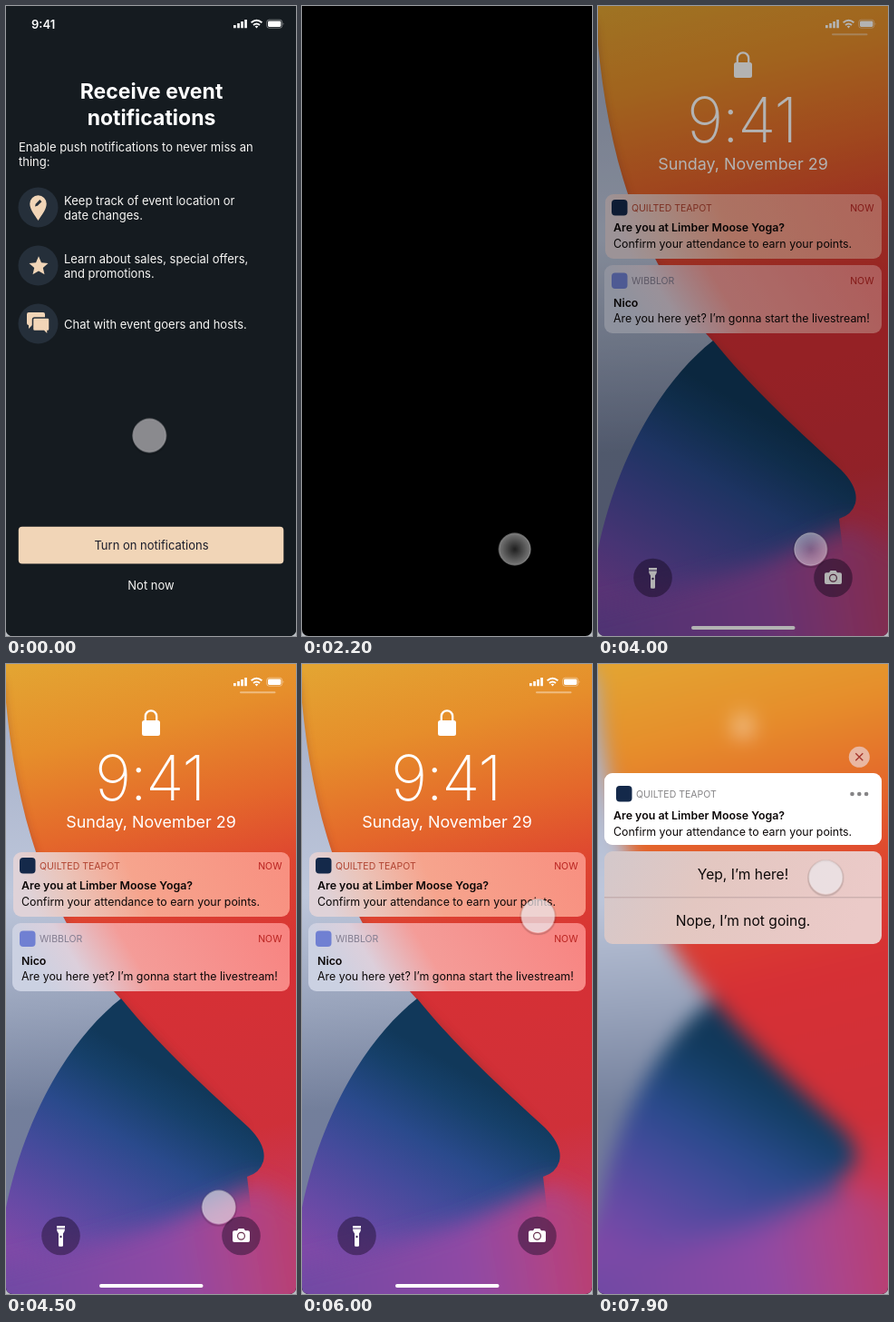
An HTML page for the animation above (8000 ms loop, 320 by 693 pixels).

```html
<!DOCTYPE html>
<html lang="en">
<head>
<meta charset="utf-8">
<title>Event notifications</title>
<style>
  html, body { margin: 0; width: 100%; height: 100%; overflow: hidden; background: #b9bec4; }
  svg { display: block; width: 100vw; height: 100vh; }
  text { font-family: Inter, Roboto, sans-serif; }
  .mid { text-anchor: middle; }
  .end { text-anchor: end; }
  .body { font-size: 13px; fill: #f7f6f4; }
  .note { font-size: 12.4px; fill: #0c0808; }
  .bold { font-weight: 600; }
  .label { font-size: 10.5px; }
  .option { font-size: 15.6px; fill: #0c0808; text-anchor: middle; }

  /* Every part shares one 8 s timeline: 1% = 80 ms */
  .app, .lock, .fade, .dim, .blur, .rise, .head, .copy, .plate,
  .show, .drop, .curX, .curY, .press, .idle, .held {
    animation: 8s linear infinite both;
  }
  .app { animation-name: app; }
  .lock { animation-name: lock; }
  .fade { animation-name: fade; }
  .dim { animation-name: dim; }
  .blur { animation-name: blur; }
  .rise { animation-name: rise; }
  .head { animation-name: head; }
  .copy { animation-name: copy; }
  .plate { animation-name: plate; }
  .show { animation-name: show; }
  .drop { animation-name: drop; transform-origin: 160px 206px; }
  .curX { animation-name: curX; }
  .curY { animation-name: curY; }
  .press { animation-name: press; }
  .idle { animation-name: idle; }
  .held { animation-name: held; }

  @keyframes app { 0%, 22.8% { opacity: 1; } 27.5%, 100% { opacity: 0; } }
  @keyframes lock {
    0%, 46.25% { opacity: 0; animation-timing-function: ease-out; }
    53.5%, 100% { opacity: 1; }
  }
  @keyframes fade { 0%, 90.6% { opacity: 1; } 94.5%, 100% { opacity: 0; } }
  @keyframes dim { 0%, 90.6% { opacity: 1; } 97%, 100% { opacity: .6; } }
  @keyframes blur {
    0%, 90.6% { filter: blur(0); animation-timing-function: ease-out; }
    97%, 100% { filter: blur(11px); }
  }
  @keyframes rise {
    0%, 90.6% { transform: none; animation-timing-function: ease-in-out; }
    97%, 100% { transform: translateY(-87px); }
  }
  @keyframes head {
    0%, 90.6% { transform: none; fill: #b0422f; animation-timing-function: ease-in-out; }
    97%, 100% { transform: translate(5px, 8px); fill: #858486; }
  }
  @keyframes copy {
    0%, 90.6% { transform: none; animation-timing-function: ease-in-out; }
    97%, 100% { transform: translateY(10px); }
  }
  @keyframes plate {
    0%, 90.6% { x: 8px; width: 305px; height: 71px; animation-timing-function: ease-in-out; }
    97%, 100% { x: 7px; width: 306px; height: 79px; }
  }
  @keyframes show { 0%, 91% { opacity: 0; } 96.5%, 100% { opacity: 1; } }
  @keyframes drop {
    0%, 91% { opacity: 0; transform: translateY(40px) scale(.6); animation-timing-function: ease-out; }
    97.5%, 100% { opacity: 1; transform: none; }
  }
  @keyframes curX {
    0%, 1% { transform: translateX(158.3px); animation-timing-function: ease-in-out; }
    19%, 57.5% { transform: translateX(234.7px); animation-timing-function: ease-in-out; }
    73% { transform: translateX(262px); animation-timing-function: ease-in-out; }
    80.5%, 100% { transform: translateX(251.3px); }
  }
  @keyframes curY {
    0%, 1% { transform: translateY(472.5px); animation-timing-function: ease-in-out; }
    19%, 57.5% { transform: translateY(597.5px); animation-timing-function: ease-in-out; }
    80.5%, 100% { transform: translateY(234.5px); }
  }
  @keyframes press {
    0%, 19% { transform: none; }
    20.5%, 47% { transform: scale(.95); }
    52%, 100% { transform: none; }
  }
  @keyframes idle { 0%, 19% { opacity: .55; } 21%, 48% { opacity: 0; } 55% { opacity: .62; } 64%, 100% { opacity: .75; } }
  @keyframes held { 0%, 19% { opacity: 0; } 21%, 48% { opacity: 1; } 55%, 100% { opacity: 0; } }
</style>
</head>
<body>
<svg viewBox="0 0 320 693" preserveAspectRatio="none">
  <defs>
    <clipPath id="screen"><rect y="-20" width="320" height="713" rx="7"/></clipPath>

    <linearGradient id="sunset" gradientUnits="userSpaceOnUse" x1="70" y1="-10" x2="240" y2="700">
      <stop offset="0" stop-color="#e3a432"/>
      <stop offset=".13" stop-color="#e68e2b"/>
      <stop offset=".27" stop-color="#e4672b"/>
      <stop offset=".38" stop-color="#de4530"/>
      <stop offset=".52" stop-color="#d63035"/>
      <stop offset=".76" stop-color="#cf3039"/>
      <stop offset=".88" stop-color="#c8385a"/>
      <stop offset="1" stop-color="#b8437a"/>
    </linearGradient>
    <linearGradient id="haze" gradientUnits="userSpaceOnUse" x1="20" y1="80" x2="50" y2="560">
      <stop offset="0" stop-color="#a9b3cb"/>
      <stop offset=".36" stop-color="#bec7db"/>
      <stop offset=".62" stop-color="#98a3bb"/>
      <stop offset=".85" stop-color="#737f9b"/>
      <stop offset="1" stop-color="#737c9b"/>
    </linearGradient>
    <linearGradient id="dome" gradientUnits="userSpaceOnUse" x1="235" y1="480" x2="110" y2="700">
      <stop offset="0" stop-color="#11385a"/>
      <stop offset=".13" stop-color="#16406a"/>
      <stop offset=".35" stop-color="#2a4a8c"/>
      <stop offset=".55" stop-color="#434b9b"/>
      <stop offset=".8" stop-color="#654aa5"/>
      <stop offset="1" stop-color="#7e49a7"/>
    </linearGradient>
    <linearGradient id="dusk" gradientUnits="userSpaceOnUse" x1="-40" y1="660" x2="330" y2="600">
      <stop offset="0" stop-color="#6b4aa4"/>
      <stop offset=".6" stop-color="#9049a4"/>
      <stop offset=".82" stop-color="#ae4488"/>
      <stop offset="1" stop-color="#bd3f68"/>
    </linearGradient>
    <linearGradient id="glassA" y1=".1" x2="1" y2="0">
      <stop offset="0" stop-color="#dfd2d8"/>
      <stop offset=".15" stop-color="#eac5bb"/>
      <stop offset=".4" stop-color="#f6a48d"/>
      <stop offset="1" stop-color="#f88f80"/>
    </linearGradient>
    <linearGradient id="glassB" y1=".15" x2="1" y2="0">
      <stop offset="0" stop-color="#cbd1e2"/>
      <stop offset=".16" stop-color="#dccfdb"/>
      <stop offset=".38" stop-color="#f49c98"/>
      <stop offset="1" stop-color="#f88380"/>
    </linearGradient>
    <linearGradient id="glassC" x2="1" y2=".15">
      <stop offset="0" stop-color="#d3c8cb"/>
      <stop offset=".4" stop-color="#e3c7c1"/>
      <stop offset="1" stop-color="#ebcac8"/>
    </linearGradient>
    <radialGradient id="ring">
      <stop offset="0" stop-color="#fff" stop-opacity=".12"/>
      <stop offset="1" stop-color="#fff" stop-opacity=".47"/>
    </radialGradient>
    <filter id="soft" x="-30%" y="-60%" width="160%" height="220%"><feGaussianBlur stdDeviation="13"/></filter>
    <filter id="shade" x="-20%" y="-20%" width="140%" height="140%"><feGaussianBlur stdDeviation="5"/></filter>

    <g id="status" fill="#fff">
      <path d="M251 21h2.7v3.2H251zM255.200 19h2.700v5.200h-2.700zM259.200 17h2.700v7.200h-2.700zM263.200 15h2.700v9.200h-2.700z"/>
      <path d="M270.600 18.300q5.900-5 11.800 0M273 21q3.500-2.900 7 0" fill="none" stroke="#fff" stroke-width="2"/>
      <path d="M274.600 22.300q1.900-1.300 3.800 0l-1.900 2.200z"/>
      <rect x="287.700" y="15.200" width="17" height="9" rx="2.600" fill="none" stroke="#fff" stroke-opacity=".5" stroke-width=".8"/>
      <rect x="289" y="16.500" width="14.400" height="6.400" rx="1.400"/>
      <path d="M305.700 18.300q1.500 1.400 0 2.800z" opacity=".6"/>
    </g>
  </defs>

  <g clip-path="url(#screen)">
    <rect width="320" height="693"/>

    <g class="app">
      <rect width="320" height="693" fill="#151b20"/>
      <text x="28" y="25" font-size="13" font-weight="600" fill="#fff">9:41</text>
      <use href="#status"/>
      <g class="mid" font-size="23" font-weight="700" fill="#fff">
        <text x="160.500" y="101.500">Receive event</text>
        <text x="160.500" y="130.500">notifications</text>
      </g>
      <g class="body">
        <text x="14" y="159.500">Enable push notifications to never miss an</text>
        <text x="14" y="175.500">thing:</text>
        <text x="64" y="218.500">Keep track of event location or</text>
        <text x="64" y="234.500">date changes.</text>
        <text x="64" y="282.500">Learn about sales, special offers,</text>
        <text x="64" y="298.500">and promotions.</text>
        <text x="64" y="354.500">Chat with event goers and hosts.</text>
        <text x="160" y="641.500" class="mid">Not now</text>
      </g>
      <g fill="#252f3a">
        <circle cx="35.500" cy="221.500" r="22"/>
        <circle cx="35.500" cy="285.500" r="22"/>
        <circle cx="35.500" cy="349.500" r="22"/>
      </g>
      <g fill="#f1d5b7">
        <path d="M35.500 236C31 229 26.300 223.500 26.300 217.500a9.200 9.200 0 0 1 18.400 0C44.700 223.500 40 229 35.500 236z"/>
        <path d="M32 220.500l.7-2.800 4.600-4.600 2.100 2.100-4.600 4.600z" fill="#252f3a"/>
        <path d="M36 275.300l3 6.900 7.500.7-5.700 5 1.700 7.400-6.500-3.900-6.500 3.900 1.700-7.400-5.700-5 7.500-.7z"/>
        <path d="M25 337h16q2 0 2 2v10q0 2-2 2H29l-4 4v-4q-2 0-2-2v-10q0-2 2-2z"/>
        <path d="M31.500 343h14.500q2 0 2 2v10.500q0 2-2 2v4.200l-4.300-4.200H31.500q-2 0-2-2V345q0-2 2-2z" stroke="#252f3a" stroke-width="1.500"/>
        <rect x="13.800" y="572.800" width="292.500" height="40.700" rx="4"/>
      </g>
      <text x="160.500" y="598" class="mid" font-size="13" fill="#1b1d2b">Turn on notifications</text>
    </g>

    <g class="lock">
      <g class="blur">
        <rect x="-50" y="-50" width="420" height="800" fill="url(#sunset)"/>
        <path d="M-50 -50L-2 20C8 145 36 270 127 369L265 509V760H-50z" fill="#7c2a2c" opacity=".35" filter="url(#shade)"/>
        <path d="M-50 -50L-2 20C8 145 36 270 127 369L150 430V760H-50z" fill="url(#haze)"/>
        <path d="M-50 760V690L0 598C22 493 72 411 127 368C172 424 229 474 268 510Q288 530 284 547Q280 560 266 564L290 760z" fill="url(#dome)"/>
        <path d="M-60 676Q110 640 190 610L278 571L375 625V790H-60z" fill="url(#dusk)" filter="url(#soft)"/>

        <g class="dim">
          <rect x="150" y="62" width="20" height="17" rx="2.500" fill="#fff"/>
          <path d="M153.800 63v-5.500a6.200 6.200 0 0 1 12.400 0V63" fill="none" stroke="#fff" stroke-width="2.300"/>
        </g>
        <g class="fade" fill="#fff">
          <use href="#status"/>
          <rect x="258" y="30.200" width="39.500" height="2" rx="1" opacity=".4"/>
          <g class="mid">
            <text x="158.500" y="150" font-size="69" font-weight="200" letter-spacing="-1.500">9:41</text>
            <text x="160" y="180.300" font-size="17.900">Sunday, November 29</text>
          </g>
          <g fill="#1e0f2d" opacity=".48">
            <circle cx="60.500" cy="629" r="21.300"/>
            <circle cx="259.500" cy="629" r="21.300"/>
          </g>
          <path d="M56 618h9v2.600h-9zM56 621.600h9q0 3-2 4.800v13.200q0 1.200-1.200 1.200h-2.600q-1.200 0-1.200-1.200v-13.200q-2-1.800-2-4.800z"/>
          <circle cx="60.500" cy="630" r="1.200" fill="#46305f"/>
          <path d="M252 623.200h3l1.600-2.200h5.800l1.600 2.200h3q2 0 2 2v8.800q0 2-2 2h-15q-2 0-2-2v-8.800q0-2 2-2z"/>
          <circle cx="259.500" cy="629.300" r="3.900" fill="none" stroke="#68304f" stroke-width="1.200"/>
          <rect x="103" y="682" width="114.500" height="4" rx="2"/>
        </g>
      </g>

      <g class="fade">
        <rect x="7" y="285" width="306" height="75" rx="9" fill="url(#glassB)"/>
        <rect x="15" y="293.500" width="17.500" height="17.500" rx="4" fill="#7080d2"/>
        <text x="37" y="306" class="label" fill="#837d90">WIBBLOR</text>
        <text x="304.500" y="306" class="label end" fill="#b9221f">NOW</text>
        <text x="17" y="330.500" class="note bold">Nico</text>
        <text x="17" y="348" class="note">Are you here yet? I’m gonna start the livestream!</text>
      </g>

      <g class="drop">
        <rect x="7" y="206" width="306" height="102" rx="9" fill="url(#glassC)"/>
        <path d="M7 256.800h306" stroke="#b59c9c" stroke-width=".8"/>
        <text x="160" y="237.300" class="option">Yep, I’m here!</text>
        <text x="160" y="288.300" class="option">Nope, I’m not going.</text>
      </g>

      <g class="rise">
        <rect class="plate" x="8" y="207" width="305" height="71" rx="9" fill="url(#glassA)"/>
        <g class="show"><rect class="plate" x="8" y="207" width="305" height="71" rx="9" fill="#fff"/></g>
        <g class="head">
          <rect x="15" y="213" width="17.500" height="17.500" rx="4" fill="#14294a"/>
          <text x="37" y="226" class="label">QUILTED TEAPOT</text>
        </g>
        <text x="304.500" y="226" class="label end fade" fill="#b9221f">NOW</text>
        <g class="copy">
          <text x="17" y="248.300" class="note bold">Are you at Limber Moose Yoga?</text>
          <text x="17" y="266.300" class="note">Confirm your attendance to earn your points.</text>
        </g>
        <g class="show">
          <g fill="#858486">
            <circle cx="280.500" cy="230" r="2.300"/>
            <circle cx="288.300" cy="230" r="2.300"/>
            <circle cx="296.100" cy="230" r="2.300"/>
          </g>
          <circle cx="288.300" cy="189.300" r="11.500" fill="#e9b7a2"/>
          <path d="M284.300 185.300l8 8m0-8l-8 8" stroke="#a5352c" stroke-width="1.300"/>
        </g>
      </g>
    </g>

    <g class="curX"><g class="curY"><g class="press">
      <circle r="19" cy="1" fill="none" stroke="#000" stroke-opacity=".16" stroke-width="2"/>
      <circle class="idle" r="18.500" fill="#ebe6ea"/>
      <circle class="held" r="18.500" fill="url(#ring)"/>
      <circle r="18.200" fill="none" stroke="#fff" stroke-opacity=".35" stroke-width=".9"/>
    </g></g></g>
  </g>
</svg>
</body>
</html>
```
